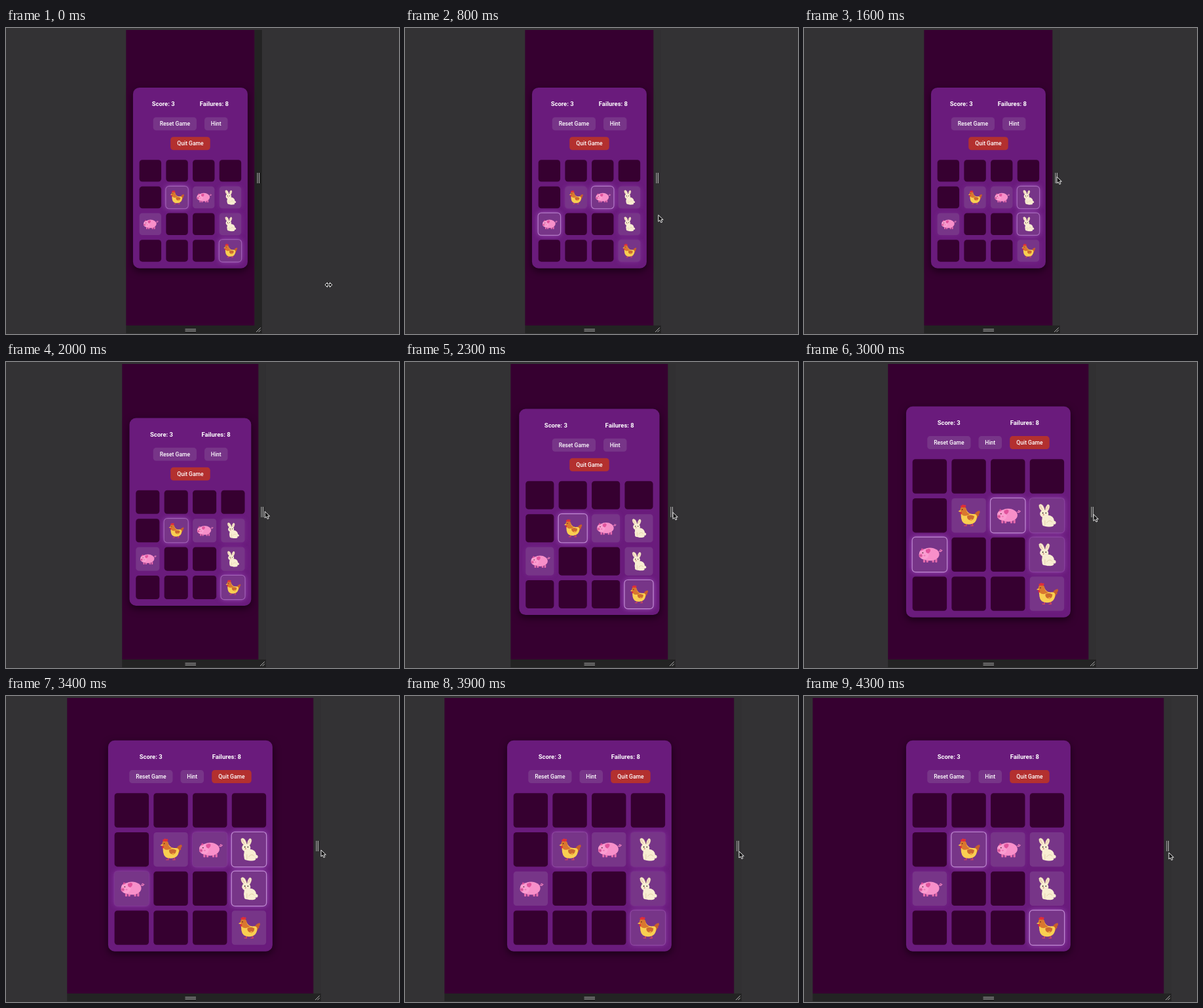
An HTML page with a canvas that plays this animation: 600x467 px, repeating every 4400 ms.

```html
<!DOCTYPE html>
<html lang="en">
<head>
<meta charset="utf-8">
<title>Responsive memory game</title>
<style>
  html, body { margin: 0; height: 100%; overflow: hidden; background: #333234; }
  canvas { display: block; }
</style>
</head>
<body>
<canvas id="stage" width="600" height="467"></canvas>
<script>
const ctx = document.getElementById('stage').getContext('2d');
const LOOP = 4400, STEP = 100, CENTER = 281.4, MIDDLE = 228.8;
const DARK = '#360030', CARD = '#6a1b7c', SOFT = '#773588';

// [time, half the viewport width]
const widths = [[1800, 98], [1900, 98.7], [2300, 120], [2500, 128], [2700, 135.3],
  [3100, 159], [3400, 188], [3700, 221], [3900, 221], [4300, 268]];
// [time, pointer x, pointer y]
const pointerPath = [[200, 492, 392], [700, 387, 300], [1200, 386, 227], [1800, 386, 227],
  [2300, 409, 229.5], [2700, 424, 231], [3100, 448, 233], [3400, 481, 235],
  [3700, 510, 237], [3900, 510, 237], [4300, 557, 239]];
// Peak time of each pair's pulse
const peaks = { hen: 250, pig: 950, rabbit: 1380 };
const board = [
  [], [null, 'hen', 'pig', 'rabbit'], ['pig', null, null, 'rabbit'], [null, null, null, 'hen']
];

function track(keys, t, column = 1) {
  const i = keys.findIndex(k => k[0] > t);
  if (i === 0) return keys[0][column];
  if (i < 0) return keys[keys.length - 1][column];
  const a = keys[i - 1], b = keys[i];
  return a[column] + (b[column] - a[column]) * (t - a[0]) / (b[0] - a[0]);
}

function box(x, y, w, h, r, fill) {
  ctx.beginPath();
  ctx.roundRect(x, y, w, h, r);
  ctx.fillStyle = fill;
  ctx.fill();
}

function oval(x, y, rx, ry, fill, angle = 0) {
  ctx.beginPath();
  ctx.ellipse(x, y, rx, ry, angle, 0, 7);
  ctx.fillStyle = fill;
  ctx.fill();
}

function shape(d, fill, stroke, width = 3) {
  const path = new Path2D(d);
  if (fill) { ctx.fillStyle = fill; ctx.fill(path); }
  if (stroke) { ctx.strokeStyle = stroke; ctx.lineWidth = width; ctx.stroke(path); }
}

function shadow(color, blur, y = 0) {
  ctx.shadowColor = color;
  ctx.shadowBlur = blur;
  ctx.shadowOffsetY = y;
}

// Animals are drawn in a 100 x 100 cell.
const animals = {
  hen() {
    shape('M43 72V80H36M60 72L62 80H55', null, '#d8475a', 2.6);
    shape('M66 52Q66 40 81 36Q85 42 79 46Q82 50 76 53Q76 60 66 62Z', '#c75f2c');
    shape('M26 34Q34 26 43 34Q48 45 60 46Q72 44 74 52Q73 75 51 76Q31 77 28 58Q27 47 26 34Z', '#f9cf51');
    shape('M25 36Q24 25 34 24Q44 25 44 38Q47 45 55 45Q45 54 33 50Q26 45 25 36Z', '#d9772f');
    shape('M45 52Q54 45 66 52Q65 65 54 64Q45 62 45 52Z', '#cc6a30');
    shape('M53 62Q58 58 61 63L57 67Z', '#f2a43c');
    shape('M27 26Q24 20 30 21Q32 16 36 20Q42 17 42 24L37 27Z', '#e22f36');
    shape('M26 34L19 38L27 40Z', '#fbc63f');
    oval(27, 43, 2.5, 4, '#e22f36');
    oval(31, 33, 1.5, 1.5, '#3b1a20');
  },
  pig() {
    shape('M76 40Q86 44 84 37Q80 33 80 40Q82 43 87 37', null, '#f07fbc', 2);
    for (const x of [34, 43, 60, 69]) box(x - 3, 62, 6, 11, 2, '#e56aac');
    oval(51, 49, 27, 19, '#f78fc9');
    oval(33, 49, 14, 15, '#fa9dd0');
    shape('M40 44Q36 34 43 35Q46 31 52 35Q54 41 46 47Z', '#e0529c');
    shape('M24 39L27 31L33 36Z', '#e0529c');
    oval(24, 53, 5, 5.5, '#ea6cae');
    oval(22.5, 53, 1, 1.8, '#a93474');
    oval(26, 53, 1, 1.8, '#a93474');
    oval(30, 45, 1.6, 1.6, '#3b1a20');
    oval(35, 53, 3, 2, '#ef74b4');
  },
  rabbit() {
    const cream = '#f8edd2', tan = '#d9c39a';
    oval(71, 71, 5, 5, cream);
    shape('M37 39Q26 30 27 20Q31 14 38 21Q43 29 44 37Z', cream, tan, 1);
    shape('M45 37Q45 24 52 18Q59 18 57 27Q55 35 50 40Z', cream, tan, 1);
    shape('M37 33Q31 27 31 21M49 33L53 23', null, '#e8bfa5', 2.5);
    oval(53, 66, 18, 17, cream);
    box(36, 50, 16, 31, 7, cream);
    oval(42, 45, 12.5, 11, cream);
    oval(59, 78, 11, 5, cream);
    shape('M49 72Q57 60 66 70M44 64V78', null, tan, 1.3);
    oval(38, 43, 1.8, 1.8, '#30231f');
    oval(47, 43, 1.5, 1.8, '#30231f');
    oval(40, 48, 2, 1.5, '#c9796a');
  }
};

function label(text, x, y, font) {
  ctx.font = font + ' Roboto, sans-serif';
  ctx.fillStyle = '#fff';
  ctx.fillText(text, x, y);
}

function button(text, x, y, w, fill = SOFT) {
  box(x, y, w, 20, 4.5, fill);
  label(text, x + w / 2, y + 13.1, '500 8.55px');
}

function cell(x, y, size, kind, t) {
  if (!kind) return box(x, y, size, size, 4.5, DARK);
  const glow = (0.5 + 0.5 * Math.cos((t - peaks[kind]) * Math.PI / 1000)) ** 1.3;
  shadow(`rgba(190,120,225,${0.75 * glow})`, 9);
  box(x, y, size, size, 4.5, SOFT);
  shadow('transparent', 0);
  ctx.beginPath();
  ctx.roundRect(x - 0.5, y - 0.5, size + 1, size + 1, 5);
  ctx.strokeStyle = `rgba(225,185,240,${0.65 * glow ** 3})`;
  ctx.lineWidth = 1.2;
  ctx.stroke();
  ctx.save();
  ctx.translate(x, y);
  ctx.scale(size / 100, size / 100);
  animals[kind]();
  ctx.restore();
}

function game(viewWidth, t) {
  const width = Math.min(0.893 * viewWidth, 251), inner = width - 19.5;
  const grid = Math.min(0.81 * viewWidth, inner);
  const wrapped = inner < 200;
  const head = wrapped ? 110.2 : 80.5, height = head + grid + 10;
  const left = CENTER - width / 2, top = MIDDLE - height / 2;

  shadow('rgba(0,0,0,.55)', 12, 4);
  box(left, top, width, height, 10, CARD);
  shadow('transparent', 0);

  const space = (inner - 79.5) / 4;
  label('Score: 3', CENTER - inner / 2 + space + 17.5, top + 28.3, 'bold 9.45px');
  label('Failures: 8', CENTER + inner / 2 - space - 22.3, top + 28.3, 'bold 9.45px');

  const row = top + 45.3, first = CENTER - (wrapped ? 56.7 : 93.2);
  button('Reset Game', first, row, 66.3);
  button('Hint', first + 78.3, row, 35.5);
  button('Quit Game', wrapped ? CENTER - 30.2 : first + 126, wrapped ? row + 30 : row, 60.5, '#b3302f');

  const gap = 7.3, size = (grid - 3 * gap) / 4;
  for (let i = 0; i < 16; i++) {
    const c = i % 4, r = i >> 2;
    cell(CENTER - grid / 2 + c * (size + gap), top + head + r * (size + gap), size, board[r][c], t);
  }
}

function pointer(t) {
  ctx.save();
  ctx.translate(track(pointerPath, t), track(pointerPath, t, 2));
  ctx.lineJoin = 'round';
  if (t < 300) {
    shape('M-5 0L-1.5 -3.5V-1.2H2.5V-3.5L6 0L2.5 3.5V1.2H-1.5V3.5Z', '#111', '#eee', 1);
  } else {
    shape('M0 0V10L2.4 7.9L4 11.5L5.9 10.7L4.3 7.2H7.4Z', '#111', '#eee', 1);
  }
  ctx.restore();
}

function draw(t) {
  const half = track(widths, t), left = 281.3 - half, right = 281.3 + half;
  ctx.fillStyle = '#333234';
  ctx.fillRect(0, 0, 600, 467);
  ctx.fillStyle = t < 600 ? '#232323' : '#313032';
  ctx.fillRect(right, 3, 11.5, 452);
  ctx.fillStyle = '#232323';
  ctx.fillRect(left, 454, 2 * half + 11.5, 12);
  ctx.fillStyle = DARK;
  ctx.fillRect(left, 3, 2 * half, 451);

  game(2 * half, t);

  const x = right + 4.6;
  shape(`M${x} 221V237M${x + 2.6} 221V237M273.5 459.8H290M273.5 462.4H290` +
    `M${right + 2.8} 464L${right + 9.5} 457.3M${right + 6.2} 464L${right + 9.5} 460.7`, null, '#b4b4b4', 1);
  pointer(t);
}

ctx.textAlign = 'center';
function tick() {
  const t = Math.floor(performance.now() % LOOP / STEP) * STEP;
  draw(t < 200 ? 0 : t);
  requestAnimationFrame(tick);
}
tick();
</script>
</body>
</html>
```
